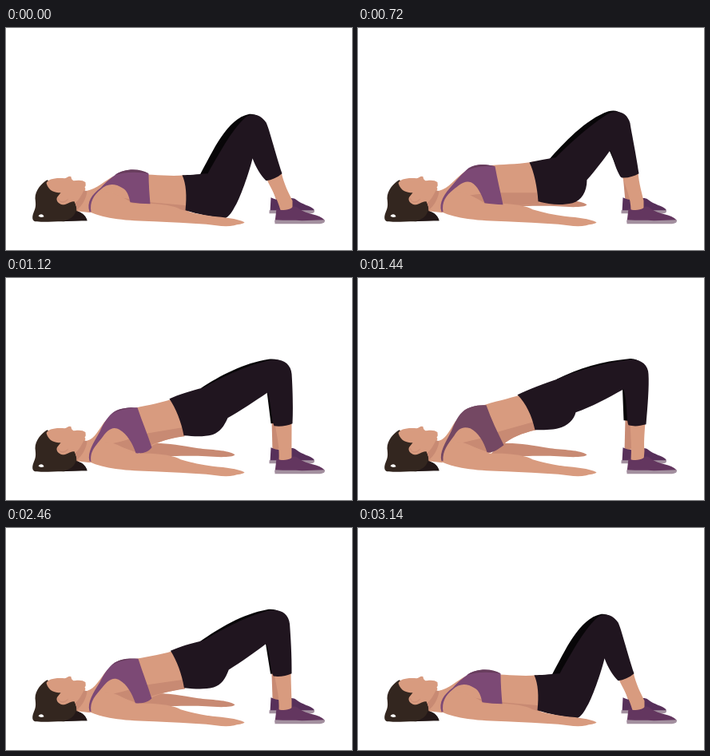
An HTML page without scripts for the animation above (3440 ms loop, 433 by 278 pixels).

```html
<!DOCTYPE html>
<html lang="en">
<head>
<meta charset="utf-8">
<title>Glute bridge</title>
<style>
  html, body { margin: 0; width: 100%; height: 100%; overflow: hidden; background: #fff; }
  svg { display: block; width: 100vw; height: 100vh; }

  .skin { fill: #d89b7f; }
  .shade { fill: #c88a73; }
  .hair { fill: #33261f; }
  .pants { fill: #20151f; }
  .sole { fill: #a3909f; }

  /* Each moving part supplies four poses, from resting (a) to fully raised (d). */
  .move { d: var(--a); animation: bridge 3.44s infinite; }
  @keyframes bridge {
    0%, 6.395% { d: var(--a); animation-timing-function: cubic-bezier(.4, 0, .75, .65); }
    20.93% { d: var(--b); animation-timing-function: linear; }
    32.56% { d: var(--c); animation-timing-function: cubic-bezier(.33, .6, .67, 1); }
    41.86% { d: var(--d); animation-timing-function: linear; }
    63.37% { d: var(--d); animation-timing-function: cubic-bezier(.33, 0, .67, .4); }
    70.4% { d: var(--c); animation-timing-function: linear; }
    78.4% { d: var(--b); animation-timing-function: cubic-bezier(.25, .35, .6, 1); }
    91.28%, 100% { d: var(--a); }
  }

  /* The top turns duller while the raised pose is held. */
  .top { fill: var(--tone); animation: bridge 3.44s infinite, dull 3.44s step-end infinite; }
  @keyframes dull {
    0%, 63.37%, 100% { fill: var(--tone); }
    41.85% { fill: #744863; }
  }

  #far-calf {
    --a: path("M328 188L338 184L346 214L338 216Z");
    --b: path("M331 184L341 182L343 214L334 216Z");
    --c: path("M332 178L342 178L343 214L333 216Z");
    --d: path("M334 176L344 176L343 214L333 216Z");
  }
  #far-leg {
    --a: path("M242 184C259 153 276 113 304 107.5C312 107 318 110 322 120L336 182L327 188L309 160L262 184Z");
    --b: path("M239 164C256 145 284 114 313 104C324 101 332 106 336 118L345 180L328 186L314 153L260 170Z");
    --c: path("M243 138C267 122 298 106 328 101.5C342 100 350 106 352 118L350 180L331 182L326 142L260 150Z");
    --d: path("M248 126.5C275 113 305 104 338 101C350 99 358 108 358 120L354 180L332 178L330.5 139L262 140Z");
  }
  #torso {
    --a: path("M97 204C108 204 120 194 131 187C150 177 190 187 224 184L230 228C210 226 195 224 180 223L150 228L88 228Z");
    --b: path("M97 204C109 204 117 193 130 182C145 168 190 173 220 167L228 219C215 222 200 222 180 222L150 228L88 228Z");
    --c: path("M97 204C108 204 113 194 122 181C140 160 178 163 214 149L223 197C208 200 195 203 182 210L150 228L88 228Z");
    --d: path("M97 204C108 204 112 194 121 180C138 158 176 156 212 143L222 190C205 194 192 199 181 208L150 228L88 228Z");
  }
  #under {
    --a: path("M138 211C150 213 165 217 180 218L226 222L228 230C210 227 200 225 182 224L158 220Z");
    --b: path("M135 210C150 207 165 206 180 206L223 206L226 220C210 221 200 222 182 222L158 220Z");
    --c: path("M132 207C148 204 160 199 178 194L220 187L223 198C208 200 192 204 183 208L165 219Z");
    --d: path("M130 206C148 202 160 199 176 192L219 180L222 190C205 194 190 200 182 208L165 219Z");
  }
  #calf {
    --a: path("M325 188L344 180C347 195 354 208 358 216L358 228L343 228C339 213 331 200 325 188Z");
    --b: path("M330 185L350 180C351 195 355 207 357 216L357 228L341 228C341 213 335 200 330 185Z");
    --c: path("M336 183L357 180C357 195 357 207 357 216L357 228L341 228C342 213 339 199 336 183Z");
    --d: path("M340 183L359 180C358 195 357 207 358 216L357 228L341 228C342 213 341 199 340 183Z");
  }
  #pants {
    --a: path("M220 184C228 184 238 183 252 182C270 150 284 125 300 111C306 106 318 107 325 118C329 126 336 155 345 182C339 187 332 190 325 191C318 184 312 174 308 163C304 180 292 215 285 225C282 231 278 236 274 238C255 236 240 233 224 228C226 210 225 195 220 184Z");
    --b: path("M214 168C224 166 233 164 247 162C262 147 285 125 311 108C322 101 336 104 340 119C341 127 347 155 351 182C344 186 336 188 329 187C322 178 320 165 315 153C308 163 296 179 286 190C286 205 279 216 268 219C254 222 240 221 225 217C224 200 220 180 214 168Z");
    --c: path("M204 151C215 146 230 141 247 137C268 125 298 110 328 103C344 99 356 106 357 120C358 135 359 160 358 182C352 185 342 186 335 185C331 176 332 160 327 143C311 154 293 166 277 175C272 186 268 192 258 196C246 199 235 198 222 197C219 180 212 163 204 151Z");
    --d: path("M199 146C213 139 230 133 250 126C275 115 305 107 338 102C352 100 363 108 363 120C364 135 362 160 360 183C352 185 346 186 338 184C335 176 337 158 332 139C312 150 292 161 272 168C270 177 262 185 250 188C242 190 231 190 221 190C217 172 210 157 199 146Z");
  }
  #bra {
    --tone: #7c4975;
    --a: path("M104 230C100 218 107 208 118 200C126 191 134 185 140 181C150 176 166 176 178 182C178 195 179 208 180 220C172 220 164 219 155 218C153 209 151 203 145 200C136 194 126 194 118 202C109 209 104 218 106 230Z");
    --b: path("M104 230C100 218 108 207 118 196C125 187 132 180 138 175C148 169 160 170 171 173C174 190 178 206 181 221C173 221 166 220 158 219C154 208 149 197 141 193C132 190 126 197 119 202C109 210 104 218 106 230Z");
    --c: path("M104 229C101 218 109 206 117 192C122 180 128 172 135 167C144 162 154 162 164 162C170 180 177 196 182 212C178 217 172 220 162 219C158 207 151 195 142 190C133 184 126 191 121 198C112 210 104 216 106 230Z");
    --d: path("M104 229C101 218 109 206 116 192C121 180 125 171 133 165C141 160 150 159 160 159C166 176 174 193 182 209C176 213 170 219 161 218C157 205 150 193 140 188C131 185 125 188 120 197C112 208 105 216 106 229Z");
  }
  #bra-edge {
    --tone: #683d5d;
    --a: path("M136 184C148 175 166 175 178 182C166 180 150 179 136 184Z");
    --b: path("M134 179C146 168 160 170 171 173C160 173 148 172 134 179Z");
    --c: path("M131 171C142 161 154 162 164 162C154 163 143 163 131 171Z");
    --d: path("M129 169C140 159 150 159 160 159C150 160 140 161 129 169Z");
  }
</style>
</head>
<body>
<svg viewBox="0 0 433 278" preserveAspectRatio="none">
  <g transform="translate(.5 .3)">
    <path class="shade" d="M178 207C200 206 215 209 240 213C255 215 278 215 286 221C283 225 262 224 250 223C230 222 205 223 190 223L165 221Z"/>

    <path id="far-calf" class="move shade"/>
    <path fill="#57305a" d="M331 212C337 215 343 216 350 214C355 212 360 212 363 215C370 221 380 222 385 227L385 230H330Z"/>
    <path class="sole" d="M329 228H385C386 231 384 232 380 232H329Z"/>
    <path id="far-leg" class="move" fill="#080608"/>

    <path class="hair" d="M51 190C44 194 36 203 36 213C37 222 37 224 34 231C32 236 32 241 36 242C44 243 60 242 70 242C82 241 92 241 101 241C100 236 96 232 90 230L84 212L68 200Z"/>
    <path fill="#231818" d="M87 229C95 230 100 236 101 241C92 241 82 241 70 242C79 240 85 236 87 229Z"/>
    <path fill="#fff" d="M40 235C42 232 46 232 47 236C44 237 42 237 40 235Z"/>

    <path id="torso" class="move skin"/>
    <path id="under" class="move shade"/>

    <path class="skin" d="M50 194C52 189 60 187 73 188C76 187 79 184 81 186C81 188 82 190 84 191C90 190 96 190 99 193C99 196 100 197 98 199C100 202 98 203 97 205L106 206L105 231L88 229C88 224 87 221 85 217C80 216 77 221 70 221C65 220 61 215 64 211L68 206C60 206 53 204 50 194Z"/>
    <path class="shade" d="M97 203L101 204C100 213 95 222 88 228C88 224 87 221 86 219C91 215 94 209 97 203Z"/>
    <path fill="none" stroke="#c88a73" d="M65 213C66 219 73 219 77 214"/>

    <path id="calf" class="move skin"/>
    <path id="pants" class="move pants"/>
    <path fill="#63365f" d="M338 226C345 229 352 228 357 225C359 222 363 223 366 226C375 233 392 233 398 240L397 243H336Z"/>
    <path class="sole" d="M336 240C350 241 360 240 370 241L398 240C400 243 396 245 390 245H336Z"/>

    <path class="skin" d="M104 230C103 214 112 205 127 205C138 207 148 213 158 219C168 220 178 219 187 220C200 221 211 223 218 227C232 231 245 234 258 235.5C272 237 288 238 298 243C296 246 289 245 285 247C274 249 262 247 250 245.5C228 244 205 243 185 242C150 241 124 239 104 230Z"/>
    <path id="bra" class="move top"/>
    <path id="bra-edge" class="move top"/>
  </g>
</svg>
</body>
</html>
```
